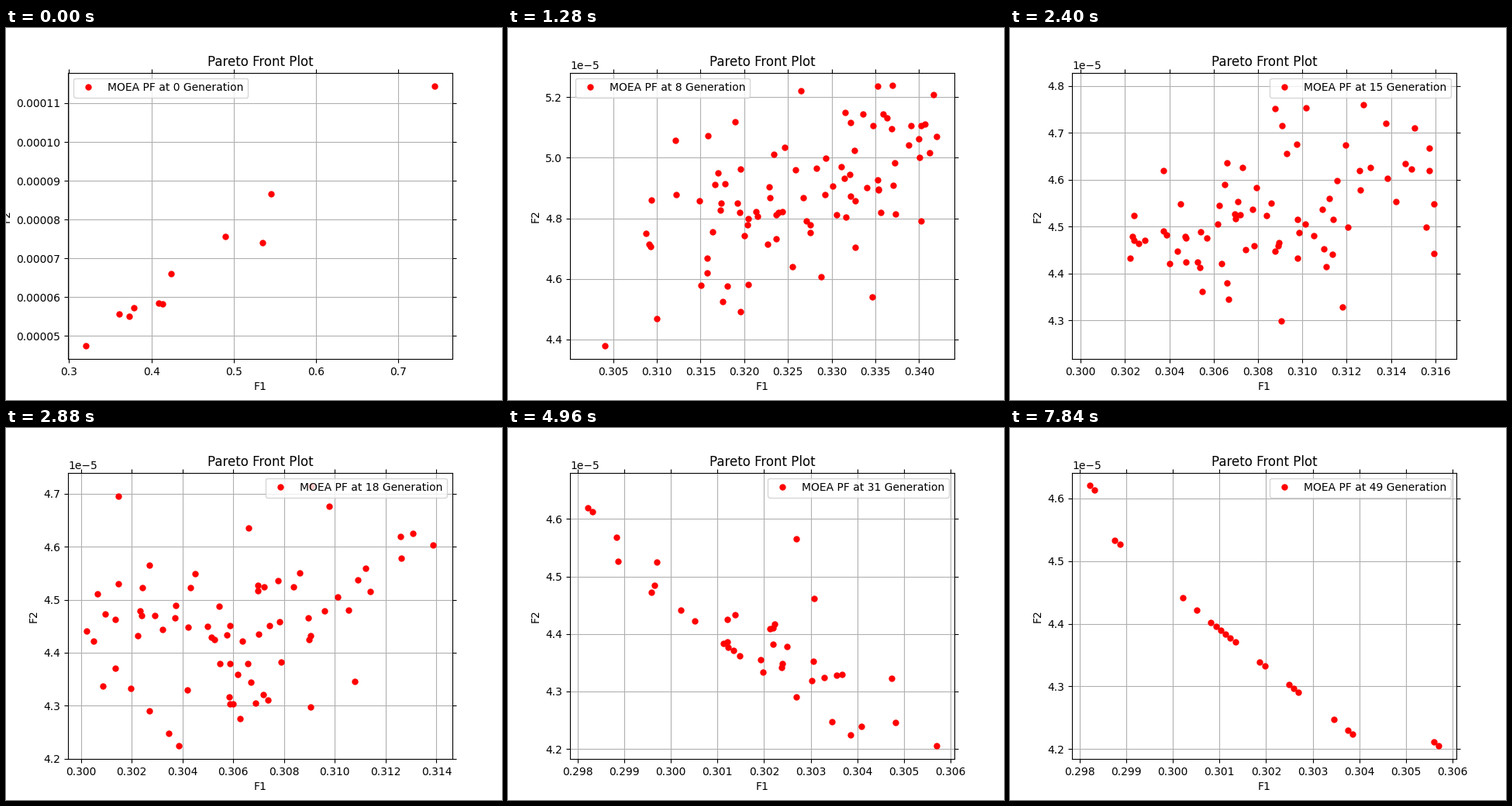
Animation of 640 by 480 pixels, one loop 8 s. Source, as a matplotlib script:

```python
import numpy as np
import matplotlib.pyplot as plt
from matplotlib.animation import FuncAnimation

GENERATIONS, INTERVAL = 50, 160
FRONT_START = 18

# Working units: F1 = 0.298 + x * 1e-5, F2 = 4e-5 + y * 1e-8
STAGES = np.array([0, 5, 12, 18, 24, 31, 49])
X_LOW = [2185, 562, 264, 218, 218, 21, 21]
X_HIGH = [44620, 7759, 2070, 1594, 1236, 771, 771]
Y_LOW = [742, 490, 268, 224, 224, 205, 205]
Y_HIGH = [7450, 1578, 896, 715, 733, 658, 620]

# Shape of the crowd: size, left skew, and centre line a + b*u + c*u^2
SIZE = [11, 91, 88, 66, 48, 26, 0]
SKEW = [2.8, 2.8, 2, 3.5, 4, 2, 2]
LEVEL = [0.07, 0.07, 0.3, 0.6, 0.55, 0.97, 0.97]
SLOPE = [1.25, 1.25, 0.3, -0.9, -1, -1.45, -1.45]
BEND = [-0.63, -0.63, 0, 0.5, 0.55, 0.48, 0.48]
SPREAD = [0.15, 0.15, 0.14, 0.14, 0.13, 0.06, 0.05]

# End of each run on the front, and its final number of members
FRONT = [(22, 620, 1), (32, 613, 1), (86, 527, 2), (221, 441, 1),
         (251, 422, 1), (334, 371, 6), (397, 333, 2), (470, 291, 3),
         (545, 248, 1), (586, 224, 2), (770, 205, 2)]
STEP = np.array([-10.4, 6.2])

# First population: F1 and the ratio F2 / F1 in 1e-4
START_F1 = np.array([0.320, 0.361, 0.373, 0.379, 0.409, 0.413,
                     0.424, 0.490, 0.535, 0.545, 0.744])
START_RATIO = np.array([1.482, 1.54, 1.476, 1.513, 1.428, 1.409,
                        1.556, 1.544, 1.386, 1.588, 1.538])


def at(gen, values):
    return np.interp(gen, STAGES, values)


def window(gen):
    """Lower and upper corner of the population, shrinking geometrically."""
    edges = [np.exp(at(gen, np.log(v)))
             for v in (X_LOW, Y_LOW, X_HIGH, Y_HIGH)]
    return np.array(edges[:2]), np.array(edges[2:])


def inside(pts, low, high):
    return pts[np.all((pts > low - 1) & (pts < high + 1), axis=1)]


def newcomers(rng, gen, count):
    low, high = window(gen)
    u = rng.beta(2, at(gen, SKEW), count)
    v = at(gen, LEVEL) + at(gen, SLOPE) * u + at(gen, BEND) * u**2
    v = v + rng.normal(0, at(gen, SPREAD), count)
    v = 1 - np.abs(1 - np.abs(v))  # fold strays back into the window
    return low + np.column_stack([u, v]) * (high - low)


def front(gen):
    """Runs on the front, each growing backwards from its end point."""
    grown = (gen - FRONT_START) / (GENERATIONS - 1 - FRONT_START)
    if grown < 0:
        return np.empty((0, 2))
    return np.array([np.array([x, y]) + k * STEP for x, y, n in FRONT
                     for k in range(int(1 + (n - 1) * grown))])


def evolve():
    """Crowd of every generation: most survive, new ones fill the gaps."""
    rng = np.random.default_rng(7)
    crowd = np.column_stack([(START_F1 - 0.298) * 1e5,
                             START_F1 * START_RATIO * 1e4 - 4000])
    history = [crowd]
    for gen in range(1, GENERATIONS):
        size = int(round(at(gen, SIZE)))
        crowd = rng.permutation(inside(crowd, *window(gen)))
        crowd = crowd[:int(0.8 * size)]
        crowd = np.vstack([crowd, newcomers(rng, gen, size - len(crowd))])
        history.append(crowd)
    return history


HISTORY = evolve()
fig, ax = plt.subplots(figsize=(6.4, 4.8), dpi=100)


def draw(gen):
    low, high = window(gen)
    elite = inside(front(gen), low, high)
    x, y = np.vstack([HISTORY[gen], elite]).T
    pad = 0.05 * (high - low)
    (x0, y0), (x1, y1) = low - pad, high + pad

    ax.clear()
    ax.plot(0.298 + x * 1e-5, 4e-5 + y * 1e-8, "o", color="red",
            markersize=5, label=f"MOEA PF at {gen} Generation")
    ax.set(title="Pareto Front Plot", xlabel="F1", ylabel="F2",
           xlim=(0.298 + x0 * 1e-5, 0.298 + x1 * 1e-5),
           ylim=(4e-5 + y0 * 1e-8, 4e-5 + y1 * 1e-8))
    ax.tick_params(top=True, right=True)
    ax.grid(True)
    ax.legend(loc="upper left" if gen < 15 else "upper right")
    return []


anim = FuncAnimation(fig, draw, frames=GENERATIONS, interval=INTERVAL,
                     init_func=lambda: [], repeat=True, repeat_delay=0)
plt.show()
```
